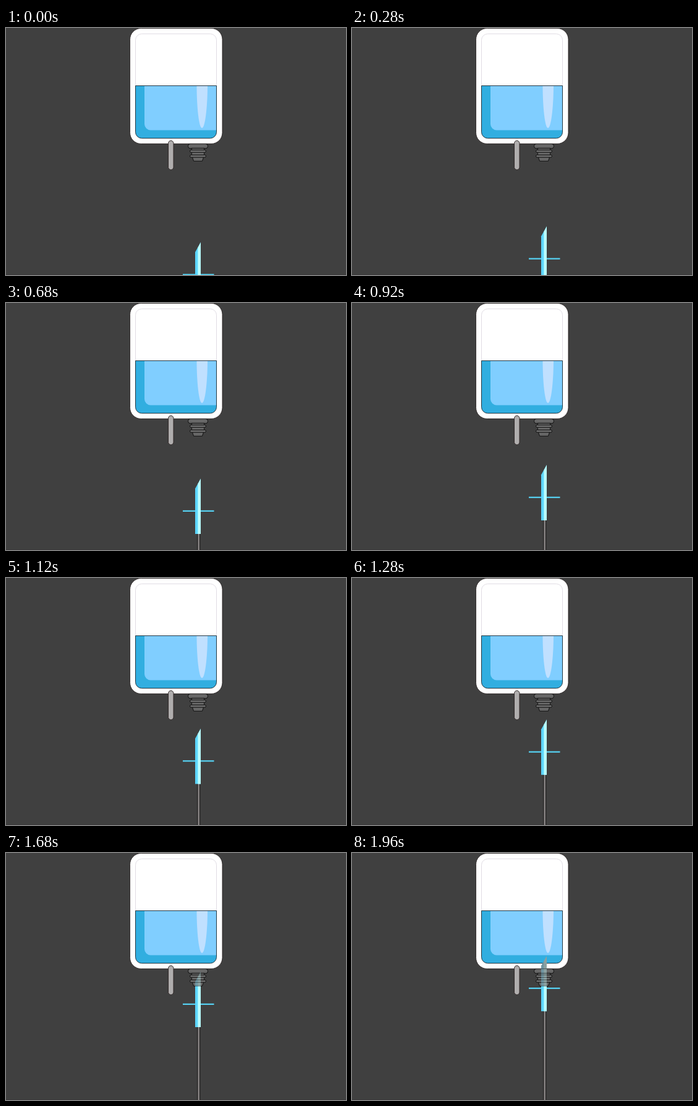
Write an HTML page that moves like this. It is 550x400 px and loops after 2.8 s.

```html
<!DOCTYPE html>
<html lang="en">
<head>
<meta charset="utf-8">
<title>Drip bag</title>
<style>
  html, body { margin: 0; width: 100%; height: 100%; overflow: hidden; background: #404040; }
  svg { display: block; width: 550px; height: 400px; }
</style>
</head>
<body>
<svg viewBox="0 0 550 400">
  <defs>
    <clipPath id="outside"><rect y="215.5" width="550" height="185"/></clipPath>
    <clipPath id="inside"><rect width="550" height="215.5"/></clipPath>
    <g id="blade">
      <path d="M306 16L315 0V89.6H306z" fill="#5cd6fe"/>
      <path d="M310.3 8.4L315 0V89.6H310.3z" fill="#b9ffff"/>
    </g>
    <g id="port">
      <rect x="294.5" y="187.5" width="32" height="7.5" rx="3.5"/>
      <rect x="300.5" y="194.5" width="20" height="3"/>
      <rect x="297.5" y="197.5" width="26" height="4" rx="2"/>
      <rect x="300.5" y="201.5" width="20" height="4"/>
      <rect x="297.5" y="205.5" width="26" height="4" rx="2"/>
      <path d="M301.5 209.5H319.5L317.5 215.5H303.5z"/>
    </g>
  </defs>

  <rect width="550" height="400" fill="#404040"/>
  <path d="M0 399.5H550" stroke="#393839"/>

  <use href="#port" fill="#666" stroke="#181818"/>

  <!-- Bag and liquid -->
  <rect x="200.5" y=".5" width="149.5" height="187" rx="18" fill="#fff" stroke="#201818" stroke-width=".8"/>
  <rect x="209.5" y="9.5" width="131" height="169" rx="10" fill="#fff" stroke="#d8d4dc" stroke-width=".8"/>
  <path d="M209.5 93.5H340.5V168.5a10 10 0 0 1-10 10H219.5a10 10 0 0 1-10-10z" fill="#31aee0"/>
  <path d="M224 93.5H340.5V165.5H234a10 10 0 0 1-10-10z" fill="#80ceff"/>
  <path d="M308.5 93.5H326C326 128 322 162 317 162S308.5 128 308.5 93.5z" fill="#c0e0ff"/>
  <path d="M209.5 93.5H340.5V168.5a10 10 0 0 1-10 10H219.5a10 10 0 0 1-10-10z" fill="none" stroke="#182830" stroke-width=".9"/>
  <rect x="262.5" y="182.5" width="8.5" height="47" rx="4.2" fill="#b0aeae" stroke="#302828"/>

  <!-- Spike, muted where it sits inside the port -->
  <g clip-path="url(#outside)">
    <g class="rise">
      <path d="M311.7 89V400" stroke="#242222" stroke-width="5"/>
      <path d="M311.7 89V400" stroke="#8c8888" stroke-width="2.4"/>
      <rect x="286" y="51.3" width="50.5" height="2.2" fill="#56d4f6"/>
      <use href="#blade"/>
    </g>
  </g>
  <g clip-path="url(#inside)">
    <g class="rise">
      <path d="M306 16L315 0V89.6H306z" fill="#777"/>
      <use href="#blade" opacity=".3"/>
    </g>
    <use href="#port" fill="none" stroke="#181818" opacity=".5"/>
  </g>
</svg>
<script>
  const parts = document.querySelectorAll('.rise');
  const LOOP = 2800, STEP = 40, LAST = 49;
  const start = performance.now();

  function draw() {
    const time = Math.max(0, performance.now() - start) % LOOP;
    const step = Math.min(LAST, Math.floor(time / STEP));
    const y = 347 - 3.68 * step;
    for (const part of parts) part.setAttribute('transform', `translate(0 ${y})`);
    requestAnimationFrame(draw);
  }
  draw();
</script>
</body>
</html>
```
